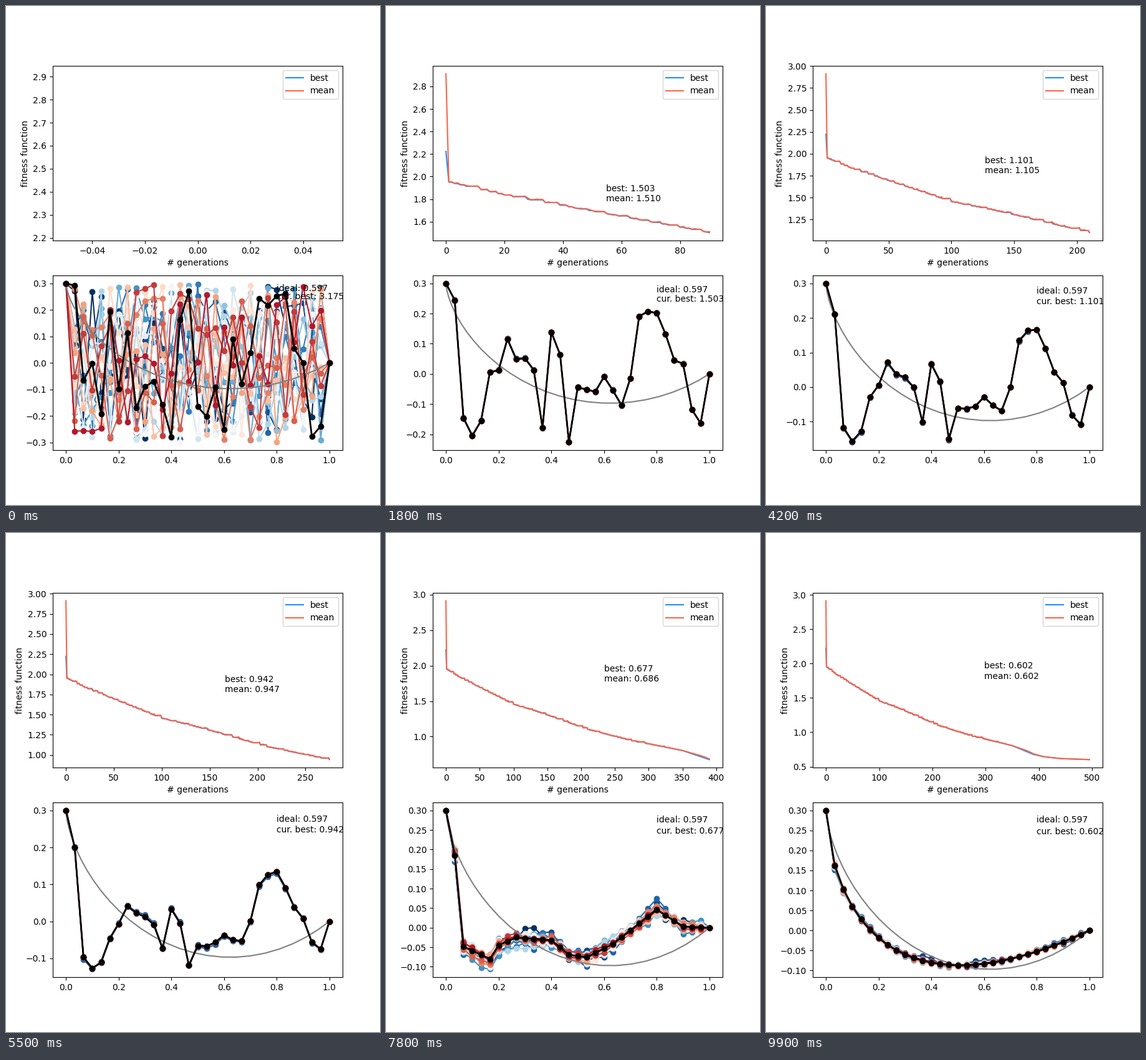
These frames come from a looping animation (600 by 800 pixels, 10000 ms). A matplotlib script:

```python
import numpy as np
import matplotlib.pyplot as plt
from matplotlib.animation import FuncAnimation

FRAMES, GENS_PER_FRAME = 100, 5
POP, NODES, START_Y = 20, 31, 0.3
EARLY, LATE = 45, 390
gens = np.arange((FRAMES - 1) * GENS_PER_FRAME + 1)
x = np.linspace(0, 1, NODES)

# Three stages of the best path: jagged, smoothed out, nearly ideal.
jagged = np.array([300, 264, -156, -223, -165, 21, 9, 129, 45, 59, 18, -221, 173, 86, -266, -35,
                   -46, -63, 0, -54, -122, -25, 210, 216, 207, 133, 42, 46, -131, -185, 0]) / 1000
settled = np.interp(np.arange(NODES),
                    [0, 1, 2, 5, 6, 8, 12, 14, 16, 19, 24, 27, 30],
                    [0.3, 0.185, -0.048, -0.08, -0.045, -0.025, -0.032, -0.069, -0.076,
                     -0.042, 0.046, 0.003, 0])
final = START_Y - 1.844 * x ** 0.67 + 1.544 * x

bumps = jagged - settled
waves = np.convolve(bumps, [1, 2, 3, 2, 1], "same") / 9
spikes = bumps - waves


def fitness_history():
    """Best and mean fitness: short plateaus on a falling trend."""
    rng = np.random.default_rng(4)
    knots = [0, 1, 20, EARLY, 100, 140, 210, 275, 350, LATE, 410, 440, 495]
    trend = np.interp(gens, knots, [2.223, 1.95, 1.836, 1.717, 1.455, 1.337, 1.101, 0.942, 0.805,
                                    0.677, 0.643, 0.617, 0.602])
    improved = (rng.random(gens.size) < 0.45) | (gens > 340)
    improved[knots] = True
    best = trend[np.maximum.accumulate(np.where(improved, gens, 0))]

    lag = 0.014 * np.exp(-((gens - 378) / 18) ** 2)
    lag += np.where(gens < 340, rng.exponential(0.003, gens.size).clip(0, 0.012), 0)
    lag[0] = 0.689
    return best, best + lag


best, mean = fitness_history()


def progress(g, first, last):
    return (best[first] - best[g]) / (best[first] - best[last])


def best_path(g):
    """Spikes fade steadily, broad waves last longer, then the path sinks to its final arc."""
    if g <= LATE:
        w = progress(g, EARLY, LATE)
        y = settled + (1 - w) * spikes + (1 - w ** 3) * waves
    else:
        y = settled + progress(g, LATE, -1) * (final - settled)
    return y.clip(-START_Y, START_Y)


def population(g):
    """All paths, the best one last."""
    rng = np.random.default_rng(g + 1)
    if g == 0:
        pop = rng.uniform(-START_Y, START_Y, (POP, NODES))
    else:
        top = best_path(g)
        noise = rng.normal(size=(POP, NODES))
        noise = (noise + (np.roll(noise, 1, 1) + np.roll(noise, -1, 1)) / 2) / 1.22
        spread = np.interp(g, [300, 350, LATE, 420, 495], [0, 0.003, 0.011, 0.006, 0.003])
        scale = spread * np.linspace(1.3, 0.5, POP)
        scale[1:3] += rng.uniform(0.001, 0.005, 2)
        pop = top + noise * scale[:, None] * (1.1 - 0.5 * x)
        pop = pop.clip(top.min() - 0.003 - 2.1 * spread, START_Y)
        pop[-1] = top
    pop[:, 0], pop[:, -1] = START_Y, 0
    return pop


def cycloid():
    """Fastest descent from (0, START_Y) to (1, 0)."""
    t = np.linspace(3, 6, 30001)
    end = t[np.argmin(abs((1 - np.cos(t)) / (t - np.sin(t)) - START_Y))]
    r = 1 / (end - np.sin(end))
    t = np.linspace(0, end, NODES)
    return r * (t - np.sin(t)), START_Y - r * (1 - np.cos(t))


fig, (ax_fit, ax_path) = plt.subplots(2, 1, figsize=(6, 8), dpi=100)

best_line, = ax_fit.plot([], [], color="dodgerblue", label="best")
mean_line, = ax_fit.plot([], [], color="tomato", label="mean")
ax_fit.set_xlabel("# generations")
ax_fit.set_ylabel("fitness function")
ax_fit.legend(loc="upper right")
fit_text = ax_fit.text(0, 0.8 * best[0], "")

pop_lines = [ax_path.plot(x, x, "o-", color=plt.cm.RdBu_r(j / POP))[0] for j in range(POP - 1)]
ax_path.plot(*cycloid(), color="gray")
pop_lines += ax_path.plot(x, x, "o-", color="black", lw=2)
ax_path.text(0.8, 0.9 * START_Y, "ideal: 0.597")
path_text = ax_path.text(0.8, 0.8 * START_Y, "")


def update(frame):
    g = frame * GENS_PER_FRAME
    best_line.set_data(gens[:g + 1], best[:g + 1])
    mean_line.set_data(gens[:g + 1], mean[:g + 1])
    fit_text.set_x(0.6 * (g + 1))
    fit_text.set_text(f"best: {best[g]:.3f}\nmean: {mean[g]:.3f}")

    for line, y in zip(pop_lines, population(g)):
        line.set_ydata(y)
    path_text.set_text(f"cur. best: {best[g] if g else 3.175:.3f}")

    for ax in (ax_fit, ax_path):
        ax.relim()
        ax.autoscale_view()


anim = FuncAnimation(fig, update, frames=FRAMES, interval=100, init_func=lambda: update(0),
                     repeat=True, repeat_delay=0)
plt.show()
```
